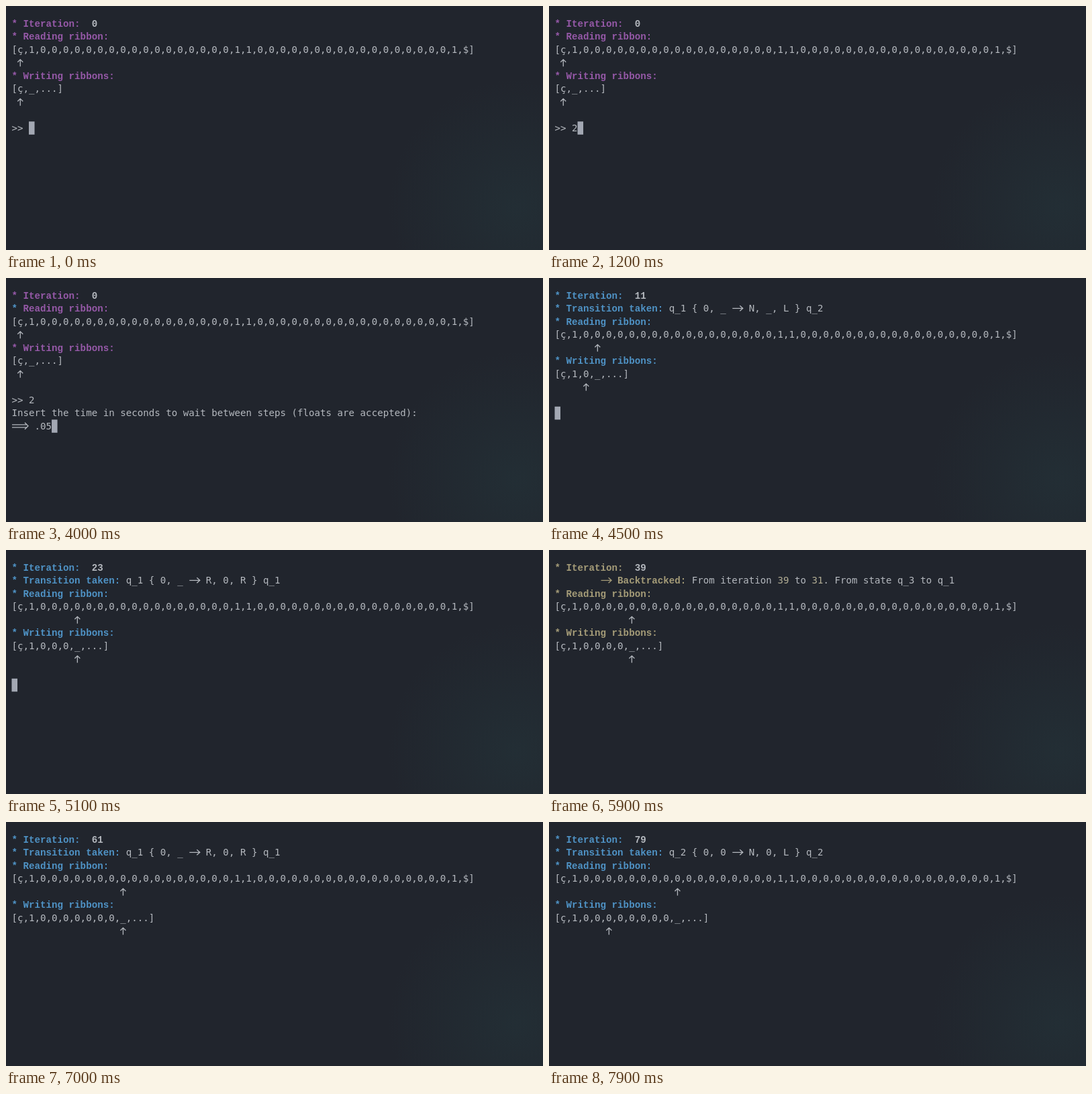
Write an HTML page with a canvas that moves like this. It is 800 px wide and 364 px high and loops after 8 s.

```html
<!DOCTYPE html>
<html lang="en">
<head>
<meta charset="utf-8">
<title>Two-ribbon machine</title>
<style>
  html, body { margin: 0; width: 100%; height: 100%; overflow: hidden; background: #21252d; }
  canvas { display: block; }
</style>
</head>
<body>
<canvas id="stage" width="800" height="364"></canvas>
<script>
const ctx = document.getElementById('stage').getContext('2d');
const LOOP = 8000, RUN_START = 4050, STEP = 50;
const LEFT = 8.5, TOP = 16.3, CELL_W = 8.51, CELL_H = 19.5;
const GRAY = '#b4b8be', PURPLE = '#9659a8', BLUE = '#4f93c6', YELLOW = '#a59c78';
const PLAIN = '14.15px "DejaVu Sans Mono", monospace';
const BOLD = 'bold 14.18px "Liberation Mono", monospace';

const word = '1' + '0'.repeat(17) + '1';
const tape = ['ç', ...word, ...word, '$'];

const colX = col => LEFT + col * CELL_W;
const rowY = row => TOP + row * CELL_H;

function put(text, col, row, color = GRAY, font = PLAIN) {
  ctx.font = font;
  ctx.fillStyle = color;
  [...text].forEach((ch, i) => ctx.fillText(ch, colX(col + i), rowY(row) + 14.5));
}

function stroke(color, ...lines) {
  ctx.strokeStyle = color;
  ctx.lineWidth = 1.3;
  ctx.beginPath();
  for (const points of lines)
    points.forEach(([x, y], i) => i ? ctx.lineTo(x, y) : ctx.moveTo(x, y));
  ctx.stroke();
}

function arrowRight(col, row, color = GRAY) {
  const x = colX(col) + 1, y = rowY(row) + 9.5, tip = x + 15.5;
  stroke(color, [[x, y], [tip, y]], [[tip - 4.5, y - 4], [tip, y], [tip - 4.5, y + 4]]);
}

function doubleArrow(row) {
  const x = colX(0) + 0.5, y = rowY(row) + 9.5, tip = x + 24;
  stroke(GRAY, [[x, y - 2], [tip - 2, y - 2]], [[x, y + 2], [tip - 2, y + 2]],
    [[tip - 5, y - 5], [tip, y], [tip - 5, y + 5]]);
}

function head(item, row) {
  const x = colX(item * 2 + 1.5), y = rowY(row) + 5;
  stroke(GRAY, [[x, y], [x, y + 10.5]], [[x - 4, y + 4], [x, y], [x + 4, y + 4]]);
}

function cursor(col, row) {
  ctx.fillStyle = '#a3a8b3';
  ctx.fillRect(colX(col), rowY(row), CELL_W, CELL_H);
}

function ribbons(row, color, read, write, length, star = color) {
  put('*', 0, row, star, BOLD);
  put('Reading ribbon:', 2, row, color, BOLD);
  put(`[${tape.join()}]`, 0, row + 1);
  head(read, row + 2);
  put('* Writing ribbons:', 0, row + 3, color, BOLD);
  put(`[${tape.slice(0, length).join()},_,...]`, 0, row + 4);
  head(write, row + 5);
}

function iteration(n, color) {
  put('* Iteration:', 0, 0, color, BOLD);
  put(String(n), 14, 0, GRAY, BOLD);
}

// Copy one symbol, guess the middle, rewind the writing head, compare, backtrack.
function machine(n) {
  let pos = 1, start = 1;
  while (start + pos + 3 <= n) start += pos++ + 3;
  const d = n - start, sym = tape[pos], prev = tape[pos - 1];
  const rule = (from, read, was, move, wrote, side, to, write) =>
    ({ pos, write, left: `q_${from} { ${read}, ${was} `, right: ` ${move}, ${wrote}, ${side} } q_${to}` });
  if (n === 1) return rule(0, 'ç', 'ç', 'R', 'ç', 'R', 1, 1);
  if (d === 0) return rule(1, prev, '_', 'R', prev, 'R', 1, pos);
  if (d === 1) return rule(1, sym, '_', 'N', '_', 'L', 2, pos - 1);
  if (d <= pos) {
    const seen = tape[pos - d + 1];
    return rule(2, sym, seen, 'N', seen, 'L', 2, pos - d);
  }
  if (d === pos + 1) return rule(2, sym, 'ç', 'N', 'ç', 'R', 3, 1);
  return { pos, write: pos, backTo: start };
}

function drawRun(t) {
  const n = 1 + Math.floor((t - RUN_START + STEP + 10) / STEP);
  const { pos, write, left, right, backTo } = machine(n);
  const color = backTo ? YELLOW : BLUE;
  iteration(n, color);
  if (backTo) {
    arrowRight(8, 1, color);
    put('Backtracked:', 11, 1, color, BOLD);
    let col = 24;
    ['From iteration ', n, ' to ', backTo, '. From state q_3 to q_1'].forEach((part, i) => {
      put(String(part), col, 1, i % 2 ? '#b3ae95' : GRAY);
      col += String(part).length;
    });
  } else {
    put('* Transition taken:', 0, 1, color, BOLD);
    put(left, 20, 1);
    arrowRight(20 + left.length, 1);
    put(right, 22 + left.length, 1);
  }
  ribbons(2, color, pos, write, pos);
  if ((t - RUN_START) % 1000 < 500) cursor(0, 9);
}

function drawPrompt(t) {
  iteration(0, PURPLE);
  ribbons(1, PURPLE, 0, 0, 1, t >= 3980 ? BLUE : PURPLE);
  put('>>', 0, 8);
  const answer = t >= 900 ? '2' : '';
  put(answer, 3, 8);
  const hidden = [[600, 900], [1500, 1900], [2750, 3000]].some(([a, b]) => t >= a && t < b);
  if (t < 2300) {
    if (!hidden) cursor(3 + answer.length, 8);
    return;
  }
  put('Insert the time in seconds to wait between steps (floats are accepted):', 0, 9);
  doubleArrow(10);
  const typed = '.05'.slice(0, [3500, 3600, 3800].filter(at => t >= at).length);
  put(typed, 4, 10);
  if (!hidden) cursor(4 + typed.length, 10);
}

const glow = ctx.createRadialGradient(760, 300, 0, 760, 300, 190);
glow.addColorStop(0, 'rgba(36, 52, 58, 0.6)');
glow.addColorStop(1, 'rgba(36, 52, 58, 0)');

function frame() {
  const t = performance.now() % LOOP;
  ctx.fillStyle = '#21252d';
  ctx.fillRect(0, 0, 800, 364);
  ctx.fillStyle = glow;
  ctx.fillRect(0, 0, 800, 364);
  (t < RUN_START ? drawPrompt : drawRun)(t);
  requestAnimationFrame(frame);
}
frame();
</script>
</body>
</html>
```
